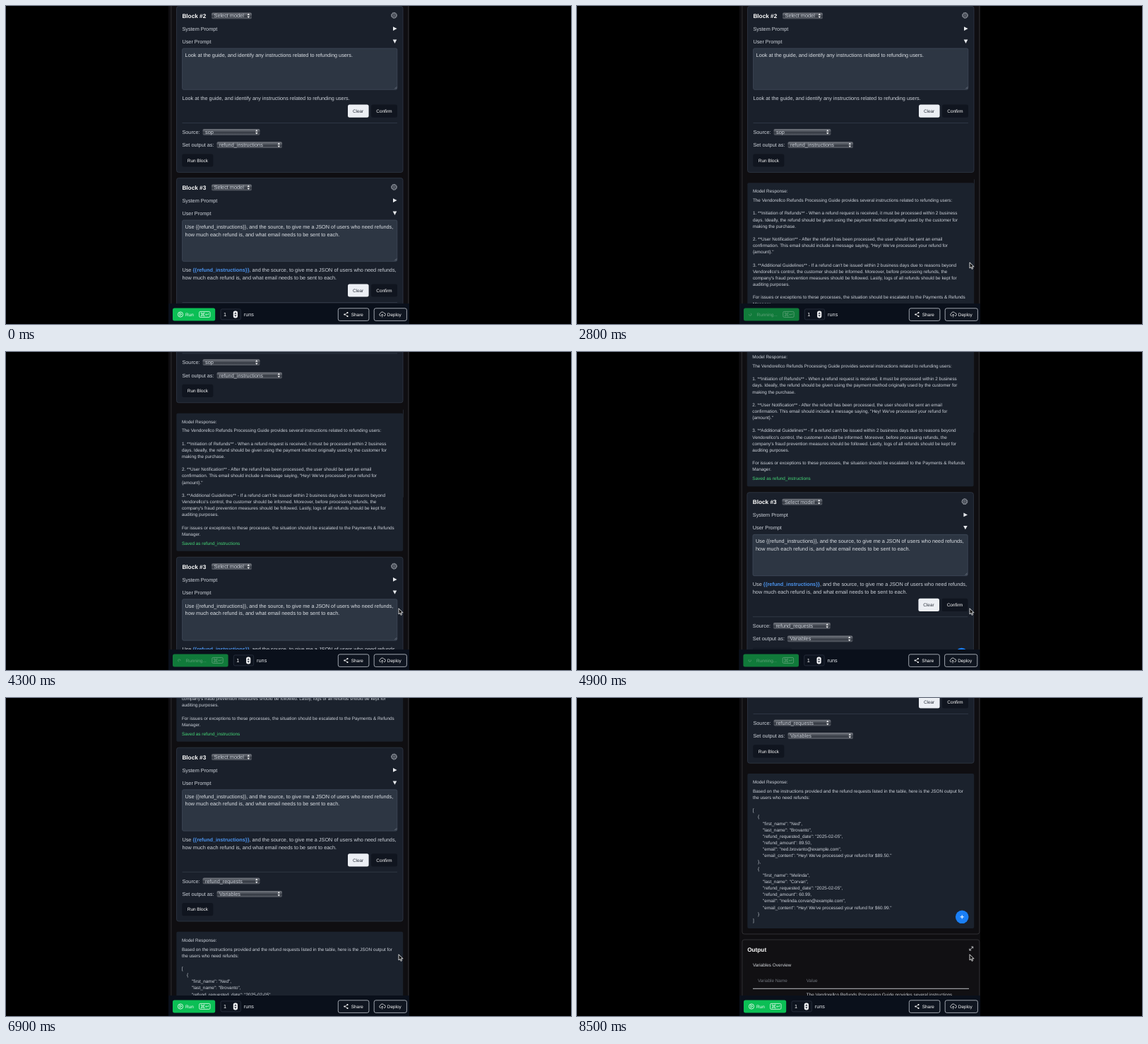
Write an HTML page that moves like this. It is 800x450 px and loops after 8.6 s.

```html
<!DOCTYPE html>
<html lang="en">
<head>
<meta charset="utf-8">
<style>
  html, body { margin: 0; width: 100%; height: 100%; overflow: hidden; background: #000; }
  svg { display: block; }
  text { font-family: "Liberation Sans", Arial, sans-serif; text-rendering: geometricPrecision; white-space: pre; }
</style>
</head>
<body>
<svg id="stage" width="800" height="450" viewBox="0 0 800 450"></svg>
<script>
const LOOP = 8600, BODY = 7.32, SMALL = 6.4, HEAD = 8.23;
const LINE = 10.8, SMALL_LINE = 9.15;

// Drawing helpers; the y of a text is the middle of its line.
const text = (x, y, s, size = BODY, fill = '#cdd2da', extra = '') =>
  `<text x="${x}" y="${y + size * 0.36}" font-size="${size}" fill="${fill}" ${extra}>${s}</text>`;
const rect = (x, y, w, h, fill, r = 0, stroke = 'none') =>
  `<rect x="${x}" y="${y}" width="${w}" height="${h}" rx="${r}" fill="${fill}" stroke="${stroke}" stroke-width=".8"/>`;
const path = (d, fill, stroke = 'none', w = 0.8) =>
  `<path d="${d}" fill="${fill}" stroke="${stroke}" stroke-width="${w}" stroke-linecap="round" stroke-linejoin="round"/>`;
const group = (id, s) => `<g id="${id}">${s}</g>`;
const rows = (x, y, list, pitch, size, fill) =>
  list.map((s, i) => text(x, y + i * pitch, s, size, fill)).join('');
const arrows = (x, y, fill) =>
  path(`M${x - 1.7} ${y - 0.8}h3.4l-1.7 -2.5zM${x - 1.7} ${y + 0.8}h3.4l-1.7 2.5z`, fill);
const select = (x, y, w, label) =>
  rect(x, y - 4.4, w, 8.8, 'url(#sel)', 2) + text(x + 3.5, y, label) + arrows(x + w - 4.7, y, '#f2f3f5');
const spinner = (x, y, color) =>
  `<g transform="translate(${x} ${y})"><g class="spin">` +
  `<circle r="1.7" fill="none" stroke="${color}" stroke-width=".9" stroke-dasharray="7 3.7" opacity=".7"/></g></g>`;
const bold = 'font-weight="700"';

function block(id, lines, preview, source, output) {
  const d = (lines.length - 1) * LINE;
  return rect(241.5, 0.4, 320.5, 235 + d, '#1a202b', 3, '#303947') +
    text(249.4, 13.8, 'Block #' + id, HEAD, '#fff', bold) +
    select(291, 13.8, 57, 'Select model') +
    `<g fill="none" stroke="#b6bbc3"><circle cx="549.5" cy="13.3" r="3.9" stroke-width="1" stroke-dasharray="1.2 .5"/>` +
    `<circle cx="549.5" cy="13.3" r="3" stroke-width=".7"/><circle cx="549.5" cy="13.3" r="1.2" stroke-width=".7"/></g>` +
    text(249.4, 32.2, 'System Prompt') + path('M548 29.2v5.8l5.6 -2.9z', '#e6e8ec') +
    text(249.4, 50.3, 'User Prompt') + path('M547.7 47.6h5.6l-2.8 5.4z', '#e6e8ec') +
    rect(249.6, 60, 304.2, 58.3, '#2d3643', 2, '#414b5a') +
    path('M550.5 117l2.4 -2.4M552 117l1 -1', 'none', '#9299a4', 0.5) +
    rows(253.6, 69.2, lines, LINE, BODY, '#dde1e6') +
    rows(249.4, 130.4, preview, LINE, BODY) +
    `<g transform="translate(0 ${d})">` +
    rect(484, 139.6, 29.6, 18.2, '#eceff4', 2.5) + text(490.9, 148.7, 'Clear', SMALL, '#2a313c') +
    rect(517, 139.6, 37, 18.2, '#10151f', 2.5) + text(524.3, 148.7, 'Confirm', SMALL, '#fff') +
    rect(249.5, 165.2, 304.5, 0.8, '#343d4a') +
    text(249.4, 178.3, 'Source:') + select(278.5, 178.3, 81, source) +
    text(249.4, 196.7, 'Set output as:') + select(298.5, 196.7, 92.5, output) +
    group('idle' + id, rect(249.3, 209.4, 44, 18.2, '#10151f', 2.5) + text(256.8, 218.5, 'Run Block', SMALL, '#fff')) +
    group('busy' + id, rect(249.3, 209.4, 55.5, 18.2, '#151b26', 2.5) + spinner(258.7, 218.5, '#7b828d') +
      text(268, 218.5, 'Running...', SMALL, '#7b828d')) +
    '</g>';
}

const response = (h, lines) =>
  rect(241.3, 0, 320.9, h, '#1b222d', 2) + text(248.9, 11.7, 'Model Response:', SMALL) +
  rows(248.9, 24.5, lines, SMALL_LINE, SMALL);

const guide = [
  'The Vendorellco Refunds Processing Guide provides several instructions related to refunding users:', '',
  '1. **Initiation of Refunds** - When a refund request is received, it must be processed within 2 business',
  'days. Ideally, the refund should be given using the payment method originally used by the customer for',
  'making the purchase.', '',
  '2. **User Notification** - After the refund has been processed, the user should be sent an email',
  'confirmation. This email should include a message saying, "Hey! We\'ve processed your refund for',
  '{amount}."', '',
  '3. **Additional Guidelines** - If a refund can\'t be issued within 2 business days due to reasons beyond',
  'Vendorellco\'s control, the customer should be informed. Moreover, before processing refunds, the',
  'company\'s fraud prevention measures should be followed. Lastly, logs of all refunds should be kept for',
  'auditing purposes.', '',
  'For issues or exceptions to these processes, the situation should be escalated to the Payments &amp; Refunds',
  'Manager.'
];
const user = (first, last, amount, end) => [
  '    {',
  ...[`"first_name": "${first}",`, `"last_name": "${last}",`, '"refund_requested_date": "2025-02-05",',
    `"refund_amount": ${amount},`, `"email": "${(first + '.' + last).toLowerCase()}@example.com",`,
    `"email_content": "Hey! We've processed your refund for $${amount}."`].map(s => '        ' + s),
  '    }' + end
];
const refunds = [
  'Based on the instructions provided and the refund requests listed in the table, here is the JSON output for',
  'the users who need refunds:', '', '[',
  ...user('Ned', 'Brovanto', '89.50', ','), ...user('Melinda', 'Corvan', '60.99', ''), ']'
];

const ask = 'Look at the guide, and identify any instructions related to refunding users.';
const use = ', and the source, to give me a JSON of users who need refunds,';
const tag = '{{refund_instructions}}';
const rest = 'how much each refund is, and what email needs to be sent to each.';

// The output card starts at the bottom edge of the block panel.
const output =
  rect(233.9, -1500, 336, 1500, 'none', 3, '#39393d') +
  rect(233.9, 8, 336, 200, '#111013', 3, '#39393d') +
  text(241.2, 21.7, 'Output', HEAD, '#fff', bold) +
  path('M556 22.8l4.6 -4.6M558.7 18h2v2M555.8 21v2h2', 'none', '#e2e4e8', 0.8) +
  text(248.9, 43.3, 'Variables Overview', SMALL, '#d5d8dd') +
  text(256, 65.8, 'Variable Name', SMALL, '#70747c') + text(324.8, 65.8, 'Value', SMALL, '#70747c') +
  rect(249, 76.8, 306, 0.9, '#d0d3d8') +
  text(324.8, 85.8, 'The Vendorellco Refunds Processing Guide provides several instructions', SMALL) +
  '<circle cx="545.2" cy="-24.2" r="9.3" fill="#1a7ff5"/>' +
  path('M543 -24.2h4.4M545.2 -26.4v4.4', 'none', '#fff', 1);

const keys = (x, color) => rect(x, 432.4, 15.4, 8, 'none', 1.5, color) +
  `<g transform="translate(${x + 5} 436.4)" fill="none" stroke="${color}" stroke-width=".6">` +
  '<path d="M-1 -1h2v2h-2zM-1 -1h-.7a.8 .8 0 1 1 .7 -.7zM1 -1v-.7a.8 .8 0 1 1 .7 .7zM1 1h.7a.8 .8 0 1 1 -.7 .7zM-1 1v.7a.8 .8 0 1 1 -.7 -.7z"/>' +
  '<path d="M8 -1.8v2h-4M5.2 -1l-1.2 1.2l1.2 1.2"/></g>';

const bar =
  rect(230, 421, 341, 29, '#0a101b') +
  group('ready', rect(236, 427.4, 60.2, 18.2, '#0bbf55', 2.5) +
    '<circle cx="247" cy="436.5" r="3.6" fill="none" stroke="#fff" stroke-width=".8"/>' +
    path('M245.9 434.8v3.4l2.7 -1.7z', 'none', '#fff', 0.7) +
    text(254, 436.5, 'Run', SMALL, '#fff') + keys(273.6, '#e9fff1')) +
  group('running', rect(236, 427.4, 78.6, 18.2, '#107a3a', 2.5) + spinner(245.3, 436.5, '#5f9f78') +
    text(254.6, 436.5, 'Running...', SMALL, '#62a27b') + keys(291.8, '#62a27b')) +
  group('count', rect(304, 428.9, 28.4, 15, '#0d131e', 2, '#2b3341') + text(308, 436.5, '1', BODY, '#fff') +
    rect(321.8, 431.6, 6.2, 9.8, '#f1f2f4', 2.6) + arrows(324.9, 436.5, '#333a45') +
    text(336.8, 436.5, 'runs', BODY, '#e3e6ea')) +
  rect(470.3, 427.8, 43.6, 17.6, '#0f1520', 2.5, '#c5cad2') +
  path('M483.3 434.2l-3.6 2.3l3.6 2.3', 'none', '#fff', 0.7) +
  [[483.5, 434], [479.3, 436.5], [483.5, 439]].map(([x, y]) => `<circle cx="${x}" cy="${y}" r="1.1" fill="#fff"/>`).join('') +
  text(488.8, 436.5, 'Share', SMALL, '#fff') +
  rect(521.2, 427.8, 46.2, 17.6, '#0f1520', 2.5, '#c5cad2') +
  path('M530.4 438.8a2 2 0 0 1 -.2 -3.9a2.6 2.6 0 0 1 4.9 -.4a2.1 2.1 0 0 1 .3 4.2M532.7 440v-3.5M531.4 437.5l1.3 -1.3l1.3 1.3', 'none', '#fff', 0.7) +
  text(539.8, 436.5, 'Deploy', SMALL, '#fff');

const $ = id => document.getElementById(id);
$('stage').innerHTML =
  '<defs><linearGradient id="sel" x2="0" y2="1"><stop stop-color="#747880"/><stop offset=".45" stop-color="#4a4f58"/>' +
  '<stop offset=".55" stop-color="#343942"/><stop offset="1" stop-color="#575c65"/></linearGradient></defs>' +
  group('app',
    rect(230, 0, 341, 450, '#0f0e11') +
    group('page',
      block(2, [ask], [ask], 'sop', 'refund_instructions') +
      group('guide', '<g transform="translate(0 250.3)">' + rect(562, -5, 0.7, 124, '#2a313c') + response(195.2, guide) +
        text(248.9, 183.8, 'Saved as refund_instructions', SMALL, '#45d777') + '</g>') +
      group('third', block(3, ['Use ' + tag + use, rest],
        [`Use <tspan fill="#4c94ee" ${bold}>${tag}</tspan>${use}`, rest], 'refund_requests', 'Variables') +
        group('refunds', `<g transform="translate(0 261)">${response(219, refunds)}</g>`)) +
      group('output', output)) +
    bar) +
  group('cursor', path('M0 0v7.8l1.8 -1.6l1.4 2.9l1.3 -.6l-1.3 -2.8h2.5z', '#111', '#fff', 0.8));

const scrollKeys = [[3100, 0], [3500, 37], [4300, 163.5], [5700, 377], [6850, 377], [7500, 462.5], [8450, 607.5]];
function along(points, t) {
  const i = points.findIndex(p => p[0] > t);
  if (i === 0) return points[0][1];
  if (i < 0) return points[points.length - 1][1];
  const [t0, a] = points[i - 1], [t1, b] = points[i];
  return a + (b - a) * (t - t0) / (t1 - t0);
}
const show = (id, on) => $(id).setAttribute('display', on ? 'inline' : 'none');
const move = (id, x, y) => $(id).setAttribute('transform', `translate(${x} ${y})`);
const spinners = document.querySelectorAll('.spin');

function draw(now) {
  const t = now % LOOP;
  const guided = t >= 500, done = t >= 6900, running = t >= 100 && !done;
  const busy2 = running && !guided, busy3 = running && guided;
  show('guide', guided);
  show('refunds', done);
  show('busy2', busy2);
  show('idle2', !busy2);
  show('busy3', busy3);
  show('idle3', !busy3);
  show('ready', !running);
  show('running', running);
  show('cursor', t >= 1900);

  const third = guided ? 453.5 : 243;
  move('third', 0, third);
  move('output', 0, third + (done ? 488 : 254));
  move('page', 0, -along(scrollKeys, t));
  move('count', running ? 18.3 : 0, 0);
  move('app', t >= 4900 && !done ? -0.6 : 0, 0);
  const near = Math.min(1, Math.max(0, (t - 1900) / 1000));
  const ease = 1 - (1 - near) ** 3;
  move('cursor', 565 - 9 * ease, 385 - 21.8 * ease);
  spinners.forEach(s => s.setAttribute('transform', `rotate(${t * 0.36})`));
  requestAnimationFrame(draw);
}
requestAnimationFrame(draw);
</script>
</body>
</html>
```
